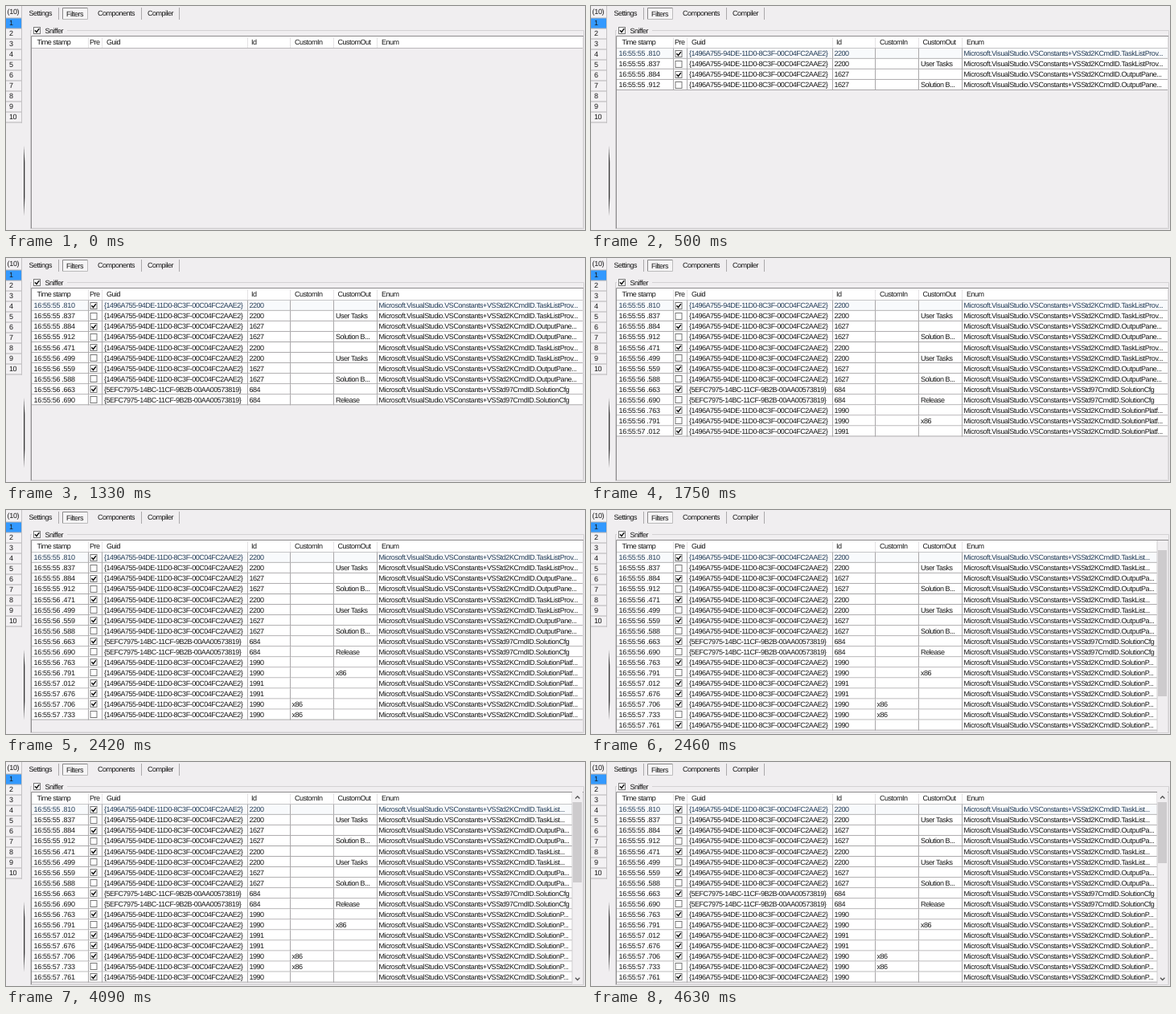
Write an HTML page that moves like this. It is 720x279 px and loops after 4.67 s.

```html
<!DOCTYPE html>
<html lang="en">
<head>
<meta charset="utf-8">
<title>Command sniffer</title>
<style>
html, body { margin: 0; width: 100%; height: 100%; overflow: hidden; background: #f0eef0; }
svg { display: block; width: 720px; height: 279px; }
text {
  font: 9px "Liberation Sans", Arial, sans-serif;
  letter-spacing: -.49px;
  text-rendering: geometricPrecision;
  fill: #161616;
  white-space: pre;
}
.loose { letter-spacing: -.3px; }
.name { letter-spacing: -.42px; }
.selected text { fill: #243c56; }
</style>
</head>
<body>
<svg id="stage" viewBox="0 0 720 279"></svg>
<script>
const LOOP = 4670;
const PITCH = 13.05;
const TOP = 52.8;
const SCROLL_START = 2460;
const ARROWS_START = 2500;
const stage = document.getElementById('stage');

function add(parent, tag, attrs, content) {
  const node = document.createElementNS('http://www.w3.org/2000/svg', tag);
  for (const key in attrs) node.setAttribute(key, attrs[key]);
  if (content !== undefined) node.textContent = content;
  parent.appendChild(node);
  return node;
}
const group = (parent, name = '') => add(parent, 'g', { class: name });
const rect = (parent, x, y, width, height, fill) =>
  add(parent, 'rect', { x, y, width, height, fill });
const label = (parent, x, y, content, name = '') =>
  add(parent, 'text', { x, y, class: name }, content);
const stroke = (parent, d, color, width = 1) =>
  add(parent, 'path', { d, fill: 'none', stroke: color, 'stroke-width': width });
const show = (node, visible) => node.setAttribute('display', visible ? 'inline' : 'none');

function checkbox(parent, x, y, checked) {
  add(parent, 'rect', { x: x + .5, y: y + .5, width: 8, height: 8, fill: '#fff', stroke: '#777' });
  if (checked) stroke(parent, `M${x + 2} ${y + 4.3}l2 2.2l3.3 -4.4`, '#111', 1.5);
}

function drawNumberList() {
  rect(stage, 0, 1, 19, 145, '#f3f1f3');
  rect(stage, 0, 15, 19, 13, '#3399ff');
  label(stage, 1.5, 10, '(10)', 'loose');
  for (let i = 0; i <= 10; i++) {
    rect(stage, 0, 14.5 + i * 13, 19, 1, '#b4b2b4');
    if (i) label(stage, 4, 11.3 + i * 13, i);
  }
  rect(stage, 19, 0, 1, 146, '#c4c2c4');
  add(stage, 'path', { d: 'M22.5 174L23.3 195V238L22.6 261L22.1 238V195Z', fill: '#222' });
}

function drawTabs() {
  rect(stage, 70, 2, 32, 15, '#f6f5f6');
  stroke(stage, 'M70.5 16.5V2.5H101.5', '#888');
  stroke(stage, 'M71 16.5H101.5V3', '#bbb');
  [65, 168, 215].forEach(x => rect(stage, x, 2, 1, 15, '#aaa8aa'));
  [['Settings', 28.5], ['Filters', 75], ['Components', 114], ['Compiler', 176]]
    .forEach(([name, x], i) => label(stage, x, i === 1 ? 13 : 12.3, name));
}

function drawPanel() {
  stroke(stage, 'M32 30.5H30.5V277.5H718.5V30.5H76', '#d3d1d3');
  checkbox(stage, 34, 26, true);
  label(stage, 48.5, 33.7, 'Sniffer');
  rect(stage, 32, 38, 686, 15, '#fff');
  stroke(stage, 'M31.5 277V37.5H718', '#8d8b8d');
  stroke(stage, 'M32 276.5H717.5V38', '#dddbdd');
  rect(stage, 32, 52, 685, 1, '#b9b7b9');
  COLUMNS.forEach(x => rect(stage, x, 39, 1, 13, '#e4e2e4'));
  [['Time stamp', 38.5], ['Pre', 104], ['Guid', 125], ['Id', 305],
   ['CustomIn', 359], ['CustomOut', 412.5], ['Enum', 467]]
    .forEach(([name, x]) => label(stage, x, 48.3, name));
}

const COLUMNS = [102, 119, 300, 353, 407, 461];
const VS_GUID = '{1496A755-94DE-11D0-8C3F-00C04FC2AAE2}';
const CFG_GUID = '{5EFC7975-14BC-11CF-9B2B-00AA00573819}';
// Each command: guid, id, constant group, full and narrow ellipsis of its name
const TASK = [VS_GUID, 2200, '2K', 'TaskListProv...', 'TaskList...'];
const PANE = [VS_GUID, 1627, '2K', 'OutputPane...', 'OutputPa...'];
const CONFIG = [CFG_GUID, 684, '97', 'SolutionCfg', 'SolutionCfg'];
const PLATFORM = [VS_GUID, 1990, '2K', 'SolutionPlatf...', 'SolutionP...'];
const PLATFORMS = [VS_GUID, 1991, '2K', 'SolutionPlatf...', 'SolutionP...'];

// Appearance time, stamp, pre, command, custom out, custom in
const ROWS = [
  [210, '55 .810', 1, TASK],
  [250, '55 .837', 0, TASK, 'User Tasks'],
  [290, '55 .884', 1, PANE],
  [330, '55 .912', 0, PANE, 'Solution B...'],
  [1130, '56 .471', 1, TASK],
  [1170, '56 .499', 0, TASK, 'User Tasks'],
  [1210, '56 .559', 1, PANE],
  [1250, '56 .588', 0, PANE, 'Solution B...'],
  [1290, '56 .663', 1, CONFIG],
  [1330, '56 .690', 0, CONFIG, 'Release'],
  [1380, '56 .763', 1, PLATFORM],
  [1420, '56 .791', 0, PLATFORM, 'x86'],
  [1670, '57 .012', 1, PLATFORMS],
  [2380, '57 .676', 1, PLATFORMS],
  [2420, '57 .706', 1, PLATFORM, '', 'x86'],
  [2420, '57 .733', 0, PLATFORM, '', 'x86'],
  [2460, '57 .761', 1, PLATFORM]
];

function makeRow([start, stamp, pre, command, out = '', input = ''], index) {
  const [guid, id, set, full, narrow] = command;
  const y = TOP + index * PITCH;
  const base = y + 9.5;
  const node = group(stage, index ? '' : 'selected');
  rect(node, 32, y, 685, PITCH, index ? '#fff' : '#f8fafc');
  rect(node, 32, y + PITCH - 1, 685, 1, '#a9a7a9');
  COLUMNS.forEach(x => rect(node, x, y, 1, PITCH, '#a9a7a9'));
  label(node, 34.5, base, '16:55:' + stamp, 'loose');
  checkbox(node, 104.5, Math.round(y + 1.7), pre);
  [[122, guid], [302.5, id], [355.5, input], [410, out]]
    .forEach(([x, value]) => value && label(node, x, base, value));
  const prefix = `Microsoft.VisualStudio.VSConstants+VSStd${set}CmdID.`;
  const name = label(node, 463.5, base, prefix + full, 'name');
  return { start, node, name, full: prefix + full, narrow: prefix + narrow };
}

function makeScrollbar() {
  const node = group(stage);
  rect(node, 704, 38, 13, 239, '#f0eef0');
  rect(node, 703.5, 38, 1, 238, '#cfcdcf');
  const arrows = group(node);
  rect(arrows, 704, 36, 13, 14, '#f0eef0');
  stroke(arrows, 'M708 45.5L710.7 42.7L713.4 45.5', '#555', 1.3);
  stroke(arrows, 'M708 268.7L710.7 271.5L713.4 268.7', '#555', 1.3);
  return { node, arrows, thumb: rect(node, 705, 50, 11, 182, '#cdcbcd') };
}

// Time and lower edge of the thumb as hidden rows keep arriving
const THUMB = [
  [2460, 232], [2500, 222], [2540, 213], [2580, 205], [2630, 197], [2670, 189], [2750, 181],
  [3380, 168],
  [3960, 163], [4000, 158], [4040, 154], [4090, 150], [4130, 146],
  [4170, 143], [4210, 140], [4250, 136], [4380, 133],
  [4590, 130], [4630, 126]
];

drawNumberList();
drawTabs();
drawPanel();
const rows = ROWS.map(makeRow);
const scrollbar = makeScrollbar();

function render(time) {
  const scrolling = time >= SCROLL_START;
  for (const row of rows) {
    show(row.node, time >= row.start);
    row.name.textContent = scrolling ? row.narrow : row.full;
  }
  show(scrollbar.node, scrolling);
  show(scrollbar.arrows, time >= ARROWS_START);
  const step = THUMB.filter(([start]) => time >= start).pop();
  if (step) scrollbar.thumb.setAttribute('height', step[1] - 50);
}

const origin = performance.now();
function tick() {
  render((performance.now() - origin) % LOOP);
  requestAnimationFrame(tick);
}
tick();
</script>
</body>
</html>
```
